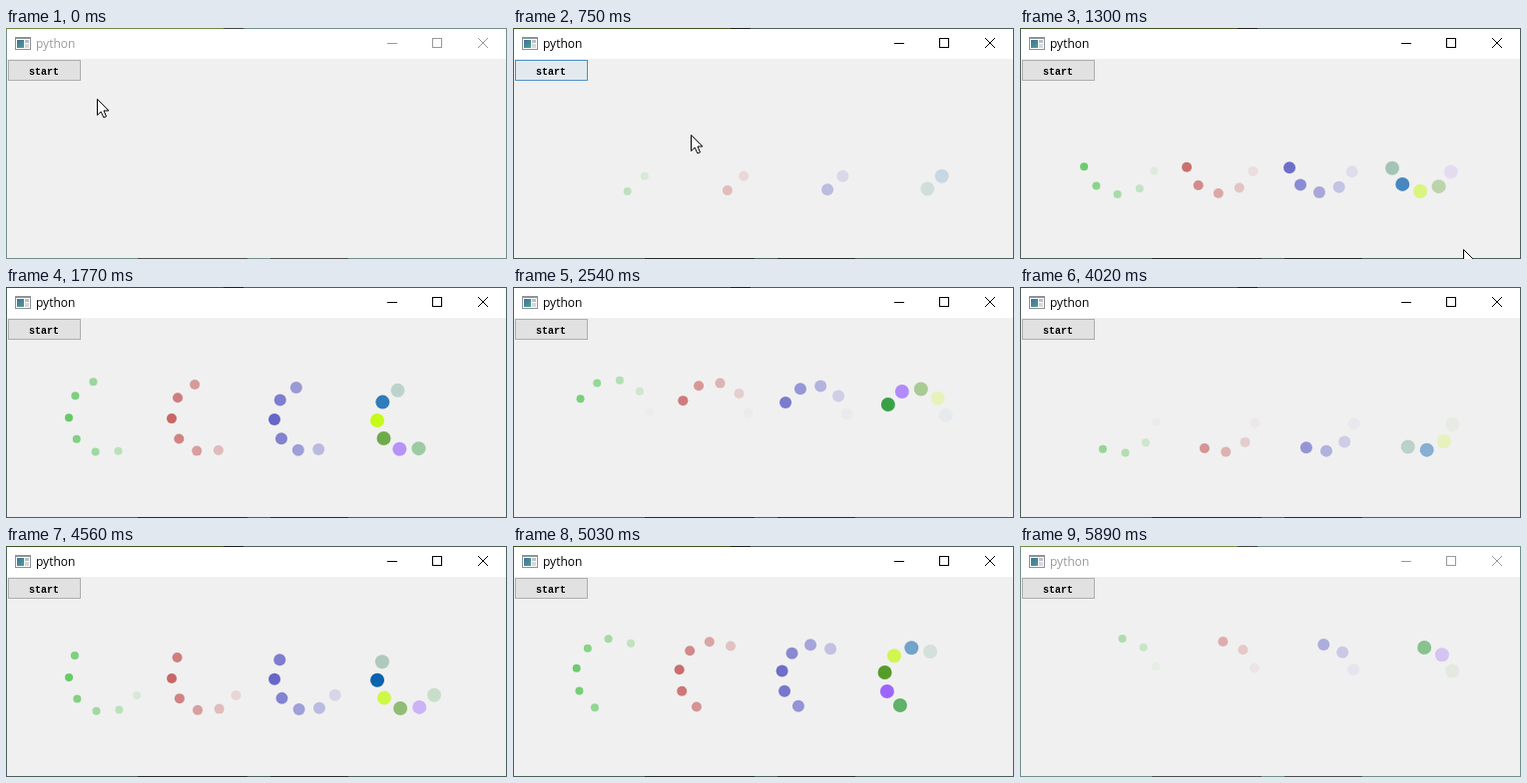
An HTML page with a canvas for the animation above (5.96 s loop, 502 by 232 pixels).

```html
<!DOCTYPE html>
<html lang="en">
<head>
<meta charset="utf-8">
<title>python</title>
<style>
  html, body { margin: 0; width: 100%; height: 100%; overflow: hidden; background: #f0f0f0; }
  canvas { display: block; width: 502px; height: 232px; }
</style>
</head>
<body>
<canvas id="stage"></canvas>
<script>
const W = 502, H = 232, LOOP = 5960;
const canvas = document.getElementById('stage');
const ratio = window.devicePixelRatio || 1;
canvas.width = W * ratio;
canvas.height = H * ratio;
const ctx = canvas.getContext('2d');

// Screen refresh runs: first time, last time, number of steps.
const RUNS = [[0, 0, 1], [70, 610, 8], [670, 1220, 8], [1300, 1850, 8], [1910, 2460, 8],
  [2540, 3090, 8], [3150, 3320, 3], [3550, 4100, 8], [4160, 4710, 8], [4800, 5340, 8], [5410, 5890, 7]];

// Spinner timing: each dot starts 200 ms after the one before and turns for 2 s.
const FIRST_TURN = 380, CYCLE = 2988, TURN = 2000, DELAY = 200, DOTS = 6;
const MIXED = [[157, 193, 176], [4, 96, 172], [197, 250, 22], [74, 152, 28], [143, 80, 255], [22, 145, 36]];
const SPINNERS = [[[100, 200, 100]], [[200, 100, 100]], [[100, 100, 200]], MIXED];

const ACTIVE_FROM = 300, ACTIVE_TO = 5800;

// Pointer path: time, x, y.
const PATH = [[0, 91, 71], [60, 86, 68], [230, 48, 46], [430, 46, 45], [510, 60, 52],
  [750, 178, 107], [1220, 426, 213], [1300, 444, 222]];

const lerp = (a, b, k) => a + (b - a) * k;
const clamp = v => Math.max(0, Math.min(1, v));
const rgb = c => `rgb(${c.map(Math.round).join(',')})`;
const blend = (a, b, k) => rgb(a.map((v, i) => lerp(v, b[i], k)));

function rect(color, x, y, w, h) {
  ctx.fillStyle = color;
  ctx.fillRect(x, y, w, h);
}

function frame(color, x, y, w, h) {
  ctx.strokeStyle = color;
  ctx.lineWidth = 1;
  ctx.strokeRect(x + 0.5, y + 0.5, w - 1, h - 1);
}

function label(text, x, y, font, color) {
  ctx.font = font;
  ctx.fillStyle = color;
  ctx.fillText(text, x, y);
}

function lines(color, ...segments) {
  ctx.strokeStyle = color;
  ctx.lineWidth = 1;
  ctx.beginPath();
  for (const [x1, y1, x2, y2] of segments) {
    ctx.moveTo(x1, y1);
    ctx.lineTo(x2, y2);
  }
  ctx.stroke();
}

function refreshTime(t) {
  const [from, to, count] = RUNS.filter(r => r[0] <= t).pop();
  if (count === 1) return from;
  const step = (to - from) / (count - 1);
  let shown = from;
  for (let i = 0; i < count; i++) {
    const at = Math.round((from + i * step) / 10) * 10;
    if (at <= t) shown = at;
  }
  return shown;
}

function drawIcon() {
  rect('#8c9296', 9, 9, 16, 13);
  rect('#ffffff', 10, 11, 14, 10);
  const g = ctx.createLinearGradient(11, 12, 18, 20);
  g.addColorStop(0, '#3f6fa0');
  g.addColorStop(1, '#4fa08c');
  rect(g, 11, 12, 7, 8);
  rect('#b9c0c6', 19, 12, 4, 3);
  rect('#d4d8dc', 19, 16, 4, 4);
}

function drawWindow(active) {
  rect('#f0f0f0', 0, 0, W, H);
  rect('#ffffff', 1, 1, W - 2, 30);
  frame(active ? '#4c615b' : '#71908a', 0, 0, W, H);
  rect(active ? '#3d5420' : '#6f8f42', 0, 0, 218, 1);
  rect(active ? '#1e231c' : '#41473d', 218, 0, 20, 1);
  const low = active ? '#262d2a' : '#4a524e';
  rect(low, 132, H - 1, 110, 1);
  rect(low, 265, H - 1, 78, 1);

  const ink = active ? '#000000' : '#999999';
  drawIcon();
  label('python', 30, 20, '12px "Open Sans", "Noto Sans", sans-serif', ink);
  rect(ink, 382, 15, 10, 1);
  frame(ink, 427, 10, 10, 10);
  lines(ink, [473, 10, 483, 20], [483, 10, 473, 20]);
}

function drawButton(t) {
  const rest = { fill: [225, 225, 225], edge: [173, 173, 173] };
  const hover = { fill: [229, 241, 251], edge: [0, 120, 215] };
  let fill, edge;
  if (t >= 300 && t < 380) {
    fill = '#cce4f7';
    edge = '#005499';
  } else {
    const k = t < 300 ? clamp((t - 150) / 100) : 1 - clamp((t - 590) / 350);
    fill = blend(rest.fill, hover.fill, k);
    edge = blend(rest.edge, hover.edge, k);
  }
  rect(fill, 2, 32, 73, 21);
  frame(edge, 2, 32, 73, 21);
  label('start', 23, 47, 'bold 10px "Liberation Mono", "DejaVu Sans Mono", monospace', '#000000');
}

function drawSpinners(t) {
  if (t < FIRST_TURN) return;
  const local = (t - FIRST_TURN) % CYCLE;
  SPINNERS.forEach((colors, s) => {
    const cx = 100 + 101 * s, cy = 130 + s;
    const orbit = 37 - 2 * s, size = 4 + s;
    for (let i = 0; i < DOTS; i++) {
      const p = (local - i * DELAY) / TURN;
      if (p <= 0 || p >= 1) continue;
      const a = p * 2 * Math.PI;
      ctx.globalAlpha = 1 - Math.abs(2 * p - 1);
      ctx.fillStyle = rgb(colors[i % colors.length]);
      ctx.beginPath();
      ctx.arc(cx + orbit * Math.cos(a), cy + orbit * Math.sin(a), size, 0, 2 * Math.PI);
      ctx.fill();
    }
  });
  ctx.globalAlpha = 1;
}

function drawPointer(t) {
  const next = PATH.findIndex(p => p[0] >= t);
  if (next < 0) return;
  const b = PATH[next], a = PATH[Math.max(0, next - 1)];
  const k = b === a ? 0 : (t - a[0]) / (b[0] - a[0]);
  ctx.save();
  ctx.translate(Math.round(lerp(a[1], b[1], k)) + 0.5, Math.round(lerp(a[2], b[2], k)) + 0.5);
  const shape = new Path2D('M0 0V16L3.7 12.6L6.4 18.4L9 17.4L6.5 11.5H11.4Z');
  ctx.fillStyle = '#ffffff';
  ctx.fill(shape);
  ctx.strokeStyle = '#000000';
  ctx.lineWidth = 1;
  ctx.stroke(shape);
  ctx.restore();
}

function draw(t) {
  ctx.setTransform(ratio, 0, 0, ratio, 0, 0);
  drawWindow(t >= ACTIVE_FROM && t < ACTIVE_TO);
  drawButton(t);
  drawSpinners(t);
  drawPointer(t);
}

const start = performance.now();
function tick() {
  draw(refreshTime((performance.now() - start) % LOOP));
  requestAnimationFrame(tick);
}
tick();
</script>
</body>
</html>
```
